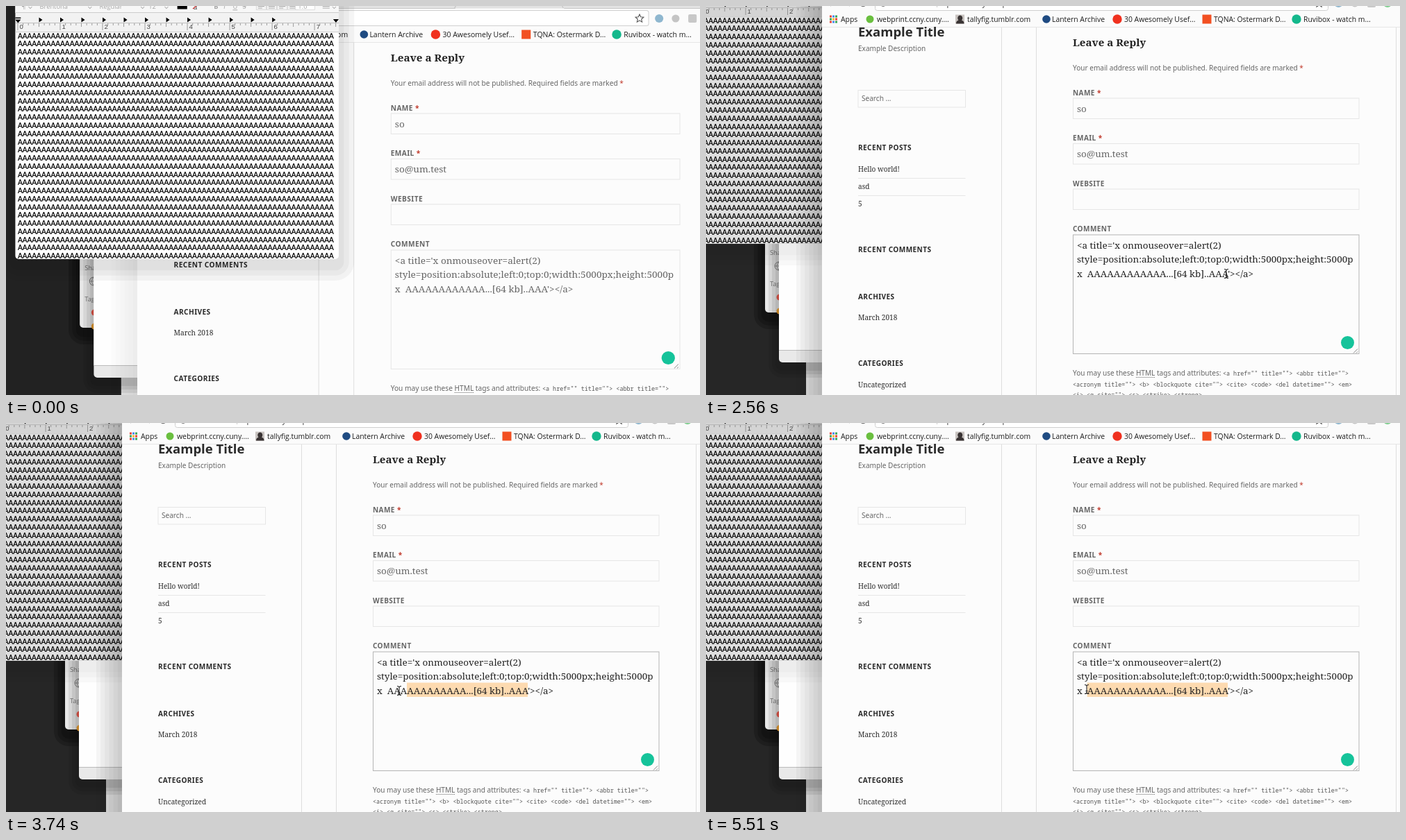
Write an HTML page that moves like this. It is 999x561 px and loops after 8 s.

```html
<!DOCTYPE html>
<html lang="en">
<head>
<meta charset="utf-8">
<title>Comment form</title>
<style>
  html, body { margin: 0; width: 100%; height: 100%; overflow: hidden; background: #242424; }
  svg { display: block; width: 100vw; height: 100vh; }
  text { white-space: pre; }
  .sans { font-family: "Noto Sans", sans-serif; }
  .serif { font-family: "Noto Serif", serif; }
  .mono { font-family: "Noto Sans Mono", monospace; font-size: 8.38px; fill: #555; }
  .ui { font-family: "Open Sans", sans-serif; }
  .arial { font-family: "Liberation Sans", Arial, sans-serif; }
  .bold { font-weight: 700; }
  .caps { font-weight: 700; letter-spacing: .04em; }
  .rows { stroke: #000; stroke-width: .2; }
</style>
</head>
<body>
<svg id="stage" viewBox="0 0 999 561" preserveAspectRatio="none"></svg>
<script>
const stage = document.getElementById('stage');
const SMALL = 10.07, BODY = 13.46, GREY = '#666', INK = '#2a2a2a';
const RED = '<tspan fill="#c0392b"> *</tspan>';

const esc = s => s.replace(/&/g, '&amp;').replace(/</g, '&lt;');
const raw = (x, y, s, cls, size, fill, more = '') =>
  `<text x="${x}" y="${y + size * .36}" class="${cls}" font-size="${size}" fill="${fill}" ${more}>${s}</text>`;
const text = (x, y, s, ...rest) => raw(x, y, esc(s), ...rest);
const rect = (x, y, w, h, fill, more = '') =>
  `<rect x="${x}" y="${y}" width="${w}" height="${h}" fill="${fill}" ${more}/>`;
const box = (x, y, w, h, more = '') => rect(x + .5, y + .5, w - 1, h - 1, '#fcfcfc', `stroke="#e6e6e6" ${more}`);
const dot = (x, y, r, fill) => `<circle cx="${x}" cy="${y}" r="${r}" fill="${fill}"/>`;
const path = (d, stroke, more = '') => `<path d="${d}" fill="none" stroke="${stroke}" ${more}/>`;
const times = (n, f) => Array.from({ length: n }, (_, i) => f(i)).join('');

// Soft window shadow made of nested translucent bands
const shadow = (x, y, w, h, size, dy, alpha, bands = 3) => times(bands, i => {
  const s = size * (bands - i) / bands;
  return rect(x - s, y - s + dy, w + 2 * s, h + 2 * s, '#000', `rx="${s + 5}" opacity="${alpha}"`);
});

function panels() {
  return shadow(85, 200, 60, 242, 16, 8, .2)
    + rect(85, 200, 60, 242, '#e8e8e8', 'rx="5"')
    + text(92, 356, 'Share', 'ui', 9.2, '#777')
    + `<circle cx="105" cy="375" r="6" fill="none" stroke="#777"/>` + path('M99 375H111M105 369q-6 6 0 12', '#777', 'stroke-width=".8"')
    + text(92, 401, 'Tags', 'ui', 9.2, '#777')
    + dot(106, 420, 4.5, '#f2594b') + dot(106, 440, 4.5, '#f5a531')
    + rect(144, 480, 100, 100, '#e4e4e4')
    + shadow(105, 300, 100, 214, 15, 7, .08)
    + rect(105, 300, 100, 214, '#e9e9e9', 'rx="5"')
    + rect(105, 300, 100, 196, '#fefefe') + path('M105 496.5H205', '#bbb');
}

function editor() {
  const inch = 60.4, left = -3.3;
  const tool = (x, s, more) => text(x, -21, s, 'ui', 9.2, '#a5a5a5', more);
  const ruler = rect(-7, -12, 461, 27.5, '#000', 'opacity=".05"')
    + path('M-7 2.5H454', '#aaa', 'stroke-width=".7"')
    + times(61, i => path(`M${left + i * inch / 8} 3v${i % 8 ? i % 4 ? 3 : 5 : 10}`, '#777', 'stroke-width=".7"'))
    + times(8, i => text(left + i * inch + 2.5, 8, String(i), 'arial', 9.5, '#444'))
    + times(12, i => `<path d="M${left + (i + 1) * inch / 2} -5.5v7l5-3.5z"/>`)
    + `<path d="M-7 -5.5h8v1.5h-8zM-7 -2.5h8l-4 5zM446 -3h8l-4 5z"/>`;
  const toolbar = rect(-7, -40, 461, 28, '#f7f7f7')
    + tool(2, '¶') + tool(28, 'Brentona') + tool(113, 'Regular') + tool(183, '12')
    + times(4, i => path(`M${[12, 97, 172, 206][i]} -21l2.5 2.5l2.5 -2.5`, '#aaa'))
    + rect(224, -30, 14, 12.5, '#000') + text(247, -21, 'a', 'serif', 10, '#444') + path('M246 -18L255 -25', '#d33')
    + tool(276, 'B', 'font-weight="700"') + tool(290, 'I', 'font-style="italic"')
    + tool(303, 'U', 'text-decoration="underline"') + tool(317, 'S', 'text-decoration="line-through"')
    + times(4, i => rect(336.5 + i * 15, -30, 14, 13.5, '#f3f3f3', 'stroke="#d0d0d0" stroke-width=".7"')
      + path(`M${339 + i * 15} -21.5h9m-9 2.5h${i % 2 ? 9 : 6}`, '#aaa'))
    + rect(392, -30, 28, 13.5, '#fff', 'stroke="#d0d0d0" stroke-width=".7"') + tool(396, '1.0')
    + path('M431 -21.5h10m-10 2.5h10', '#aaa') + path('M445 -21l2.5 2.5l2.5 -2.5', '#aaa');
  const rows = times(28, i => text(left, 21 + i * 11.76, 'A'.repeat(67), 'arial rows', 10.09, '#000'));
  return `<g id="editShade">${shadow(-7, -40, 461, 383, 22, 9, .04)}</g>`
    + `<clipPath id="editClip">${rect(-7, -60, 461, 403, '#000', 'rx="5"')}</clipPath>`
    + `<g clip-path="url(#editClip)"><rect id="paper" x="-7" y="-60" width="461" height="403"/>`
    + toolbar + path('M-7 -12.5H454', '#ccc') + ruler + path('M-7 15.5H454', '#ccc') + rows + '</g>';
}

function toolbar() {
  const mark = (x, s) => text(x, 19, s, 'ui', 10.4, '#1c1c1c');
  const apps = ['#e8453c', '#f9bb2d', '#3aa757', '#4688f1'];
  return rect(167, -40, 900, 71, '#fbfbfb') + rect(167, -40, 900, 21.5, '#e2e2e2')
    + path('M167 -18.5H620M775 -18.5H1067', '#c8c8c8') + path('M768 -30l6 11M625 -30l-6 11', '#c0c0c0')
    + rect(243.5, -15.5, 652, 22, '#fff', 'rx="3" stroke="#cfcfcf"')
    + path('M186 -4h-10m4 -4l-4 4l4 4M200 -4h10m-4 -4l4 4l-4 4M230 -6a4.5 4.5 0 1 0 0 4', '#777', 'stroke-width="1.3"')
    + `<circle cx="255" cy="-4" r="4.5" fill="none" stroke="#777"/>`
    + text(265, -4, 'Not Secure', 'ui', 11, '#777') + path('M332.5 -11v13', '#ccc')
    + text(338, -4, 'wpdemo.key.lv/wp', 'ui', 11, '#333')
    + path('M882.6 -10l1.7 3.8 4.1.4-3.1 2.8.9 4.1-3.6-2.2-3.6 2.2.9-4.1-3.1-2.8 4.1-.4z', '#555', 'stroke-width="1.1"')
    + dot(910.5, -4, 6, '#8fb7cf') + dot(934, -4, 5.5, '#c4c4c4')
    + rect(952, -10, 12, 12, '#c8c8c8', 'rx="2"') + dot(981, -4, 6, '#7fcf8f')
    + times(9, i => rect(178 + i % 3 * 4, 13.5 + (i / 3 | 0) * 4, 3, 3, apps[(i * 3 + (i / 3 | 0)) % 4]))
    + mark(194, 'Apps')
    + dot(236, 19, 5.5, '#6abf3f') + mark(246, 'webprint.ccny.cuny....')
    + rect(359, 12.5, 13, 13, '#c9c4c1') + '<path d="M360 25.5q0-4 3.5-5a3.5 4 0 1 1 4.5 0q3.5 1 3.5 5z" fill="#3a3434"/>'
    + mark(376, 'tallyfig.tumblr.com')
    + dot(490, 19, 5.8, '#1f4b82') + mark(498, 'Lantern Archive')
    + dot(592, 19, 6.7, '#f0311f') + mark(602, '30 Awesomely Usef...')
    + rect(714.5, 12.5, 13, 13, '#f25022') + mark(731, 'TQNA: Ostermark D...')
    + dot(850, 19, 6.7, '#14b88c') + mark(860, 'Ruvibox - watch m...')
    + path('M167 30.5H1067', '#e6e6e6');
}

function sidebar() {
  const head = (y, s) => text(219, y, s, 'sans caps', SMALL, INK);
  const item = (y, s) => text(219, y, s, 'serif', SMALL, INK);
  return text(219, 37, 'Example Title', 'sans bold', 18.5, INK)
    + text(219, 61, 'Example Description', 'sans', SMALL, GREY)
    + box(218.5, 121, 155.5, 25.5) + text(224, 133.5, 'Search ...', 'sans', SMALL, GREY)
    + head(204.5, 'RECENT POSTS') + item(235, 'Hello world!') + item(260, 'asd') + item(285.5, '5')
    + path('M219 248.5H373.5M219 273.5H373.5', '#e6e6e6')
    + head(351.5, 'RECENT COMMENTS')
    + head(419, 'ARCHIVES') + item(449, 'March 2018')
    + head(515.5, 'CATEGORIES') + item(546, 'Uncategorized');
}

function form() {
  const label = (y, s, star = '') => raw(528, y, s + star, 'sans caps', SMALL, GREY);
  const code = (y, s) => text(528, y + .5, s, 'mono', 8.38, GREY);
  const lines = ["<a title='x onmouseover=alert(2)",
    'style=position:absolute;left:0;top:0;width:5000px;height:5000p',
    "x  AAAAAAAAAAAA...[64 kb]..AAA'></a>"];
  return text(528, 52.5, 'Leave a Reply', 'serif bold', 15.1, '#222')
    + raw(528, 89.5, 'Your email address will not be published. Required fields are marked' + RED, 'sans', SMALL, GREY)
    + label(125, 'NAME', RED) + box(528, 132.5, 412.5, 30.5) + text(534, 148, 'so', 'serif', BODY, GREY)
    + label(190, 'EMAIL', RED) + box(528, 198, 412.5, 30.5) + text(534, 213.5, 'so@um.test', 'serif', BODY, GREY)
    + label(256, 'WEBSITE') + box(528, 263.5, 412.5, 30.5)
    + label(321, 'COMMENT') + box(528, 329.5, 412.5, 172.5, 'id="area"')
    + rect(0, 374.5, 0, 20.5, '#fddab0', 'id="sel"')
    + `<g id="words">${lines.map((s, i) => text(534, 345.5 + i * 20.13, s, 'serif', BODY, 'currentColor')).join('')}</g>`
    + path('M738.5 338v16', '#000', 'id="caret"')
    + dot(923.5, 485.5, 9.5, '#15c39a') + path('M932 500.5l6 -6M936 500.5l2 -2', '#777', 'stroke-width=".9"')
    + raw(528, 529.5, 'You may use these HTML tags and attributes: <tspan class="mono">'
        + esc('<a href="" title=""> <abbr title="">') + '</tspan>', 'sans', SMALL, GREY)
    + path('M619 535.5h27', GREY, 'stroke-dasharray="1 1"')
    + code(545, '<acronym title=""> <b> <blockquote cite=""> <cite> <code> <del datetime=""> <em>')
    + code(560, '<i> <q cite=""> <s> <strike> <strong>');
}

stage.innerHTML = '<rect id="desk" width="999" height="561"/><g id="scene">'
  + `<g>${panels()}</g><g id="edit">${editor()}</g>`
  + `<g id="browser"><g id="webShade">${shadow(167, -60, 900, 800, 37, 9, .035, 6)}</g>`
  + rect(167, 0, 900, 700, '#fcfcfc')
  + path('M425.5 31V600M475.5 31V600M993.5 31V600', '#dedede') + toolbar() + sidebar() + form()
  + '<g id="beam">'
  + path('M-3 -6.5q3 0 3 2v9q0 2 -3 2M3 -6.5q-3 0 -3 2v9q0 2 3 2M-1.5 2.5h3', '#222', 'stroke-width="1.1"')
  + '</g></g></g>';

const el = id => document.getElementById(id);
const set = (id, name, value) => el(id).setAttribute(name, value);

// Pointer path: time, x, y
const track = [[1090, 797, 391], [1680, 734, 383], [2120, 749, 386], [2720, 749, 386], [3290, 622, 386],
  [3590, 582, 386], [3890, 549, 385], [4490, 547, 385], [4940, 537, 384], [5510, 548, 384]];

function pointer(t) {
  const i = track.findIndex(k => k[0] > t);
  if (i < 0) return track[track.length - 1].slice(1);
  if (!i) return track[0].slice(1);
  const [a, b] = [track[i - 1], track[i]], p = (t - a[0]) / (b[0] - a[0]);
  return [1, 2].map(n => a[n] + (b[n] - a[n]) * p);
}

// The selection trails the pointer and snaps to whole letters
function selectionStart(t) {
  const x = pointer(t - 100)[0], first = 548.7, advance = 9.43;
  return Math.max(first, first + Math.round((x - first) / advance) * advance);
}

let typing = null;
function render(t) {
  const active = t >= 1090;
  if (active !== typing) {
    typing = active;
    el('scene').append(el(active ? 'browser' : 'edit'));
    set('scene', 'transform', active ? '' : 'matrix(1.0103 0 0 1 20.3 22)');
    set('desk', 'fill', active ? '#262626' : '#222');
    set('paper', 'fill', active ? '#dfdfdf' : '#fff');
    set('editShade', 'opacity', active ? .6 : 1);
    set('webShade', 'opacity', active ? 1 : .35);
    set('area', 'stroke', active ? '#b4b4b4' : '#e6e6e6');
    set('words', 'color', active ? '#222' : GREY);
    set('beam', 'visibility', active ? 'visible' : 'hidden');
  }
  const step = 1090 + Math.floor((t - 1090) / 147 + .06) * 147;
  const [x, y] = pointer(step);
  set('beam', 'transform', `translate(${Math.round(x)} ${Math.round(y)})`);
  const blink = (t >= 1090 && t < 1530) || (t >= 2110 && t < 2560);
  set('caret', 'visibility', blink ? 'visible' : 'hidden');
  const from = selectionStart(step), selecting = step > 2720;
  set('sel', 'x', from);
  set('sel', 'width', selecting ? Math.max(0, 751 - from) : 0);
}

const start = performance.now();
function tick() {
  render((performance.now() - start) % 8000);
  requestAnimationFrame(tick);
}
tick();
</script>
</body>
</html>
```
